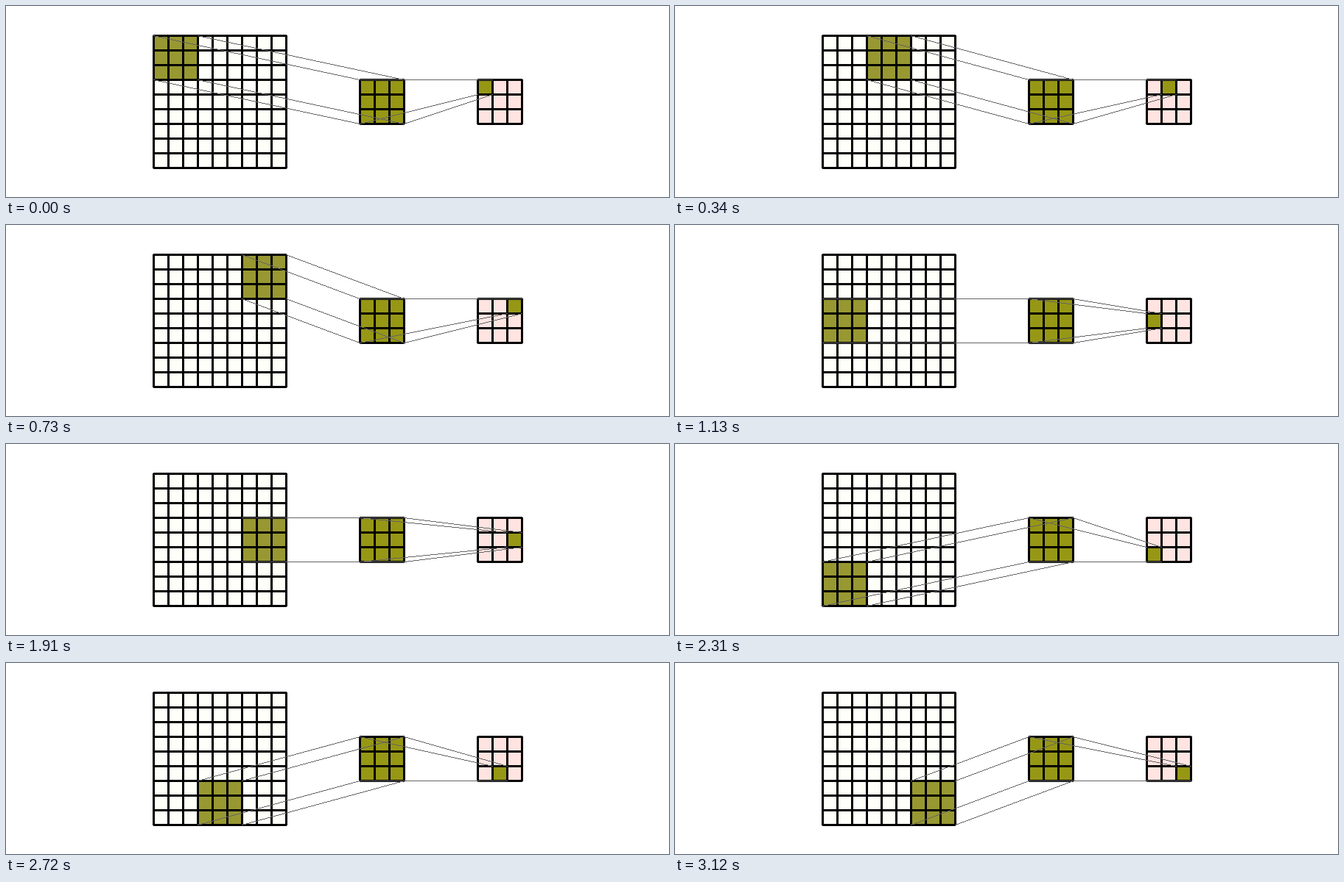
These frames come from a looping animation (900x260 px, 3.54 s). An HTML page with a canvas:

```html
<!DOCTYPE html>
<html lang="en">
<head>
<meta charset="utf-8">
<title>Convolution with stride three</title>
<style>
html, body { margin: 0; width: 900px; height: 260px; overflow: hidden; background: #fff; }
canvas { display: block; }
</style>
</head>
<body>
<canvas id="stage" width="900" height="260"></canvas>
<script>
const ctx = document.getElementById("stage").getContext("2d");
const CELL = 20, LOOP = 3540;
const STARTS = [0, 340, 730, 1130, 1510, 1910, 2310, 2720, 3120];
const INPUT = { x: 200, y: 40, n: 9, fill: "#fffffa" };
const KERNEL = { x: 480, y: 100, n: 3, fill: "#979716" };
const OUTPUT = { x: 640, y: 100, n: 3, fill: "#ffe4e1" };

function square(x, y, n, color) {
  ctx.fillStyle = color;
  ctx.fillRect(x, y, n * CELL, n * CELL);
}

function gridLines({ x, y, n }) {
  const size = n * CELL + 1;
  ctx.fillStyle = "#000";
  for (let i = 0; i <= n; i++) {
    ctx.fillRect(x, y + i * CELL - 1, size, 3);
    ctx.fillRect(x + i * CELL - 1, y, 3, size);
  }
}

// Crisp one-pixel line; every connector is wider than it is tall
function thinLine(x0, y0, x1, y1) {
  const dx = x1 - x0;
  for (let i = 0; i <= dx; i++) {
    ctx.fillRect(x0 + i, Math.round(y0 + (y1 - y0) * i / dx), 1, 1);
  }
}

// Joins matching corners of two squares
function connect(a, b) {
  ctx.fillStyle = "#646464";
  for (const u of [0, 1]) {
    for (const v of [0, 1]) {
      const sa = a.n * CELL, sb = b.n * CELL;
      thinLine(a.x + u * sa, a.y + v * sa, b.x + u * sb, b.y + v * sb);
    }
  }
}

function draw(step) {
  const col = step % 3, row = Math.floor(step / 3);
  const patch = { x: INPUT.x + col * 3 * CELL, y: INPUT.y + row * 3 * CELL, n: 3 };
  const result = { x: OUTPUT.x + col * CELL, y: OUTPUT.y + row * CELL, n: 1 };

  ctx.fillStyle = "#fff";
  ctx.fillRect(0, 0, 900, 260);
  for (const g of [INPUT, KERNEL, OUTPUT]) square(g.x, g.y, g.n, g.fill);
  square(patch.x, patch.y, 3, "#989832");
  square(result.x, result.y, 1, KERNEL.fill);
  [INPUT, KERNEL, OUTPUT].forEach(gridLines);
  connect(patch, KERNEL);
  connect(KERNEL, result);
}

const origin = performance.now();
function tick() {
  const t = (performance.now() - origin) % LOOP;
  draw(STARTS.filter(s => s <= t).length - 1);
  requestAnimationFrame(tick);
}
tick();
</script>
</body>
</html>
```
